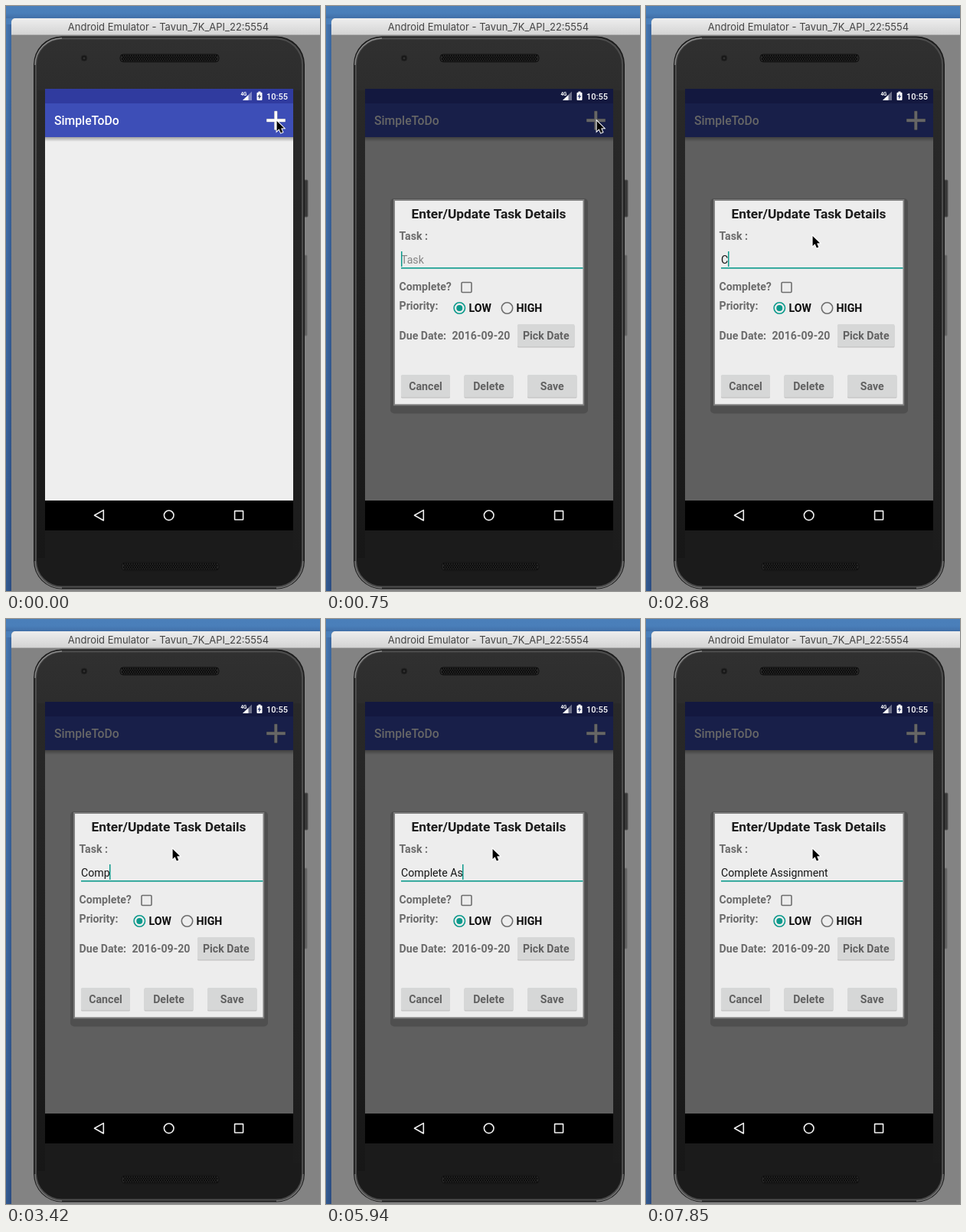
An HTML page with a canvas that plays this animation: 410 px wide and 763 px high, repeating every 8 s.

```html
<!DOCTYPE html>
<html lang="en">
<head>
<meta charset="utf-8">
<title>Task entry</title>
<style>
  html, body { margin: 0; width: 100%; height: 100%; overflow: hidden; background: #838383; }
  canvas { display: block; width: 410px; height: 763px; }
</style>
</head>
<body>
<canvas id="stage" width="410" height="763"></canvas>
<script>
const ctx = document.getElementById('stage').getContext('2d');
const LOOP = 8000, OPEN = 600, DIMMED = 750, BLINK = 443;
const DP = 324 / 411.4;
const TEAL = '#0d9a8c', LABEL = '#6b6b6b';
const TASK = 'Complete Assignment';
const KEY_TIMES = [2680, 2970, 3120, 3420, 3570, 3710, 4010, 4300, 4900, 5640,
  5940, 6080, 6230, 6520, 6670, 6820, 6960, 7110, 7400];
const MOVE_TIMES = [750, 900, 1040, 1190, 1340, 1490];

function rect(x, y, w, h, fill) {
  ctx.fillStyle = fill;
  ctx.fillRect(x, y, w, h);
}

function round(x, y, w, h, r, fill, stroke, width = 1) {
  ctx.beginPath();
  ctx.roundRect(x, y, w, h, r);
  paint(fill, stroke, width);
}

function circle(x, y, r, fill, stroke, width = 1) {
  ctx.beginPath();
  ctx.arc(x, y, r, 0, Math.PI * 2);
  paint(fill, stroke, width);
}

function poly(points, fill, stroke, width = 1) {
  ctx.beginPath();
  points.forEach(([x, y]) => ctx.lineTo(x, y));
  ctx.closePath();
  paint(fill, stroke, width);
}

function paint(fill, stroke, width) {
  if (fill) { ctx.fillStyle = fill; ctx.fill(); }
  if (stroke) { ctx.strokeStyle = stroke; ctx.lineWidth = width; ctx.stroke(); }
}

function gradient(x0, y0, x1, y1, ...colors) {
  const g = ctx.createLinearGradient(x0, y0, x1, y1);
  colors.forEach((c, i) => g.addColorStop(i / (colors.length - 1), c));
  return g;
}

function text(str, x, y, sp, weight, fill, align = 'left') {
  ctx.font = `${weight} ${sp * DP}px Roboto, sans-serif`;
  ctx.textAlign = align;
  ctx.fillStyle = fill;
  ctx.fillText(str, x, y);
}

function drawWindow() {
  rect(0, 0, 410, 763, gradient(0, 0, 0, 763, '#4a7fba', '#416fa8', '#365f96'));
  rect(0, 9, 410, 7, gradient(0, 9, 0, 16, 'rgba(0,0,40,0)', 'rgba(0,0,40,.12)'));
  rect(0, 24, 7, 739, gradient(0, 0, 7, 0, 'rgba(0,0,40,.03)', 'rgba(0,0,40,.2)'));
  round(7, 16, 420, 760, [5, 0, 0, 0], '#838383');
  round(7, 16, 420, 22, [5, 0, 0, 0], gradient(0, 16, 0, 38, '#eeeeee', '#d3d3d3'));
  rect(7, 37, 403, 1, '#b4b4b4');
  ctx.font = '13px Inter, sans-serif';
  ctx.textAlign = 'center';
  ctx.fillStyle = '#444';
  ctx.fillText('Android Emulator - Tavun_7K_API_22:5554', 212, 32);
}

function drawGrille(x, y, w) {
  round(x, y, w, 10, 4, '#262626', '#111');
  for (let row = 0; row < 4; row++)
    for (let dx = 2 + row % 2 * 1.5; dx < w - 3; dx += 3)
      rect(x + dx, y + 0.8 + row * 2.2, 1.8, 1.8, '#080808');
}

function drawPhone() {
  round(389, 227, 5, 48, 1, '#383838', '#555');
  round(389, 325, 4, 105, 1, '#5e5e5e', '#707070');
  round(36, 39.5, 354, 721, 37, '#1c1c1c');
  round(37.7, 41.2, 350.6, 717.6, 35.5, '#4c4c4c');
  round(40, 43.5, 346, 713, 33, gradient(0, 44, 0, 756, '#303030', '#242424', '#1b1b1b', '#1b1b1b'));
  rect(41, 110, 10, 610, gradient(0, 110, 0, 720, '#292929', '#171717'));
  rect(375, 110, 10, 600, gradient(0, 110, 0, 710, '#292929', '#1c1c1c'));
  ctx.beginPath();
  ctx.arc(73, 77, 35, Math.PI, Math.PI * 1.5);
  paint(null, '#8a8a8a', 1.4);
  ctx.beginPath();
  ctx.arc(353, 724, 35, 0, Math.PI / 2);
  ctx.moveTo(73, 759);
  ctx.arc(73, 724, 35, Math.PI / 2, Math.PI);
  paint(null, '#757575', 1.4);
  circle(102, 68, 4, '#171717', '#262626');
  circle(102, 68, 1.5, '#303030');
  drawGrille(149, 63, 129);
  drawGrille(151, 726, 127);
}

function drawPlus() {
  const arms = [[350.7, 137.3], [354, 137.3], [354, 147.5], [364.5, 147.5], [364.5, 150.9],
    [354, 150.9], [354, 161.3], [350.7, 161.3], [350.7, 150.9], [340.5, 150.9],
    [340.5, 147.5], [350.7, 147.5]];
  ctx.lineJoin = 'round';
  poly(arms, '#fff', '#a8a8a8', 1);
  poly(arms, '#fff');
}

function drawApp(dim) {
  rect(51, 171, 324, 475, '#eeeeee');
  rect(51, 171, 324, 6, gradient(0, 171, 0, 177, 'rgba(0,0,0,.32)', 'rgba(0,0,0,0)'));
  rect(51, 108, 324, 19, '#303b9f');
  rect(51, 127, 324, 44, '#3d4eb7');
  text('SimpleToDo', 63, 155, 20, 500, '#fff');
  drawPlus();
  if (dim) rect(51, 108, 324, 538, `rgba(0,0,0,${dim})`);
}

function drawSystemBars() {
  poly([[309, 123], [321, 123], [321, 111.5]], 'rgba(255,255,255,.38)');
  poly([[309, 123], [316.5, 123], [316.5, 116]], '#fff');
  text('4G', 306.5, 117, 8, 700, '#fff');
  rect(329.5, 111.5, 3, 2, '#fff');
  round(327.5, 112.7, 7, 10.3, 1, '#fff');
  poly([[331.6, 114], [328.6, 118.6], [330.5, 118.6], [330, 122], [333.2, 117.3], [331.3, 117.3]], '#303b70');
  text('10:55', 340, 122, 14, 500, '#fff');

  rect(51, 645, 324, 39, '#000');
  ctx.lineJoin = 'round';
  poly([[115.5, 664.3], [127.3, 657.6], [127.3, 671]], null, '#f0f0f0', 1.6);
  circle(212.7, 664.3, 6.3, null, '#f0f0f0', 1.6);
  round(298.6, 658.6, 11, 11.4, 0.6, null, '#f0f0f0', 1.6);
}

function drawButton(label, x, y, w) {
  round(x, y + 1, w, 29.5, 1.5, '#c2c2c2');
  round(x, y, w, 29.3, 1.5, '#d6d7d7');
  text(label, x + w / 2, y + 20, 18, 700, '#616161', 'center');
}

function drawDialog(t, opening) {
  if (opening) {
    round(79, 247, 267, 290, 8, '#6b6b6b');
    round(83, 250, 259, 282, 6, '#616161');
  } else {
    round(84, 251, 258, 280.5, 5, '#4f4f4f');
  }
  rect(88, 252, 249.3, 269.3, '#7e7e7e');
  rect(90, 254, 245.5, 265.3, '#ededed');
  text('Enter/Update Task Details', 212.5, 277, 22, 700, '#1c1c1c', 'center');

  text('Task :', 95.5, 305, 18, 700, LABEL);
  drawInput(t);
  text('Complete?', 95.5, 371, 18, 700, LABEL);
  round(177, 360.5, 13, 13, 1.2, null, '#6e6e6e', 1.6);

  text('Priority:', 95.5, 396, 18, 700, LABEL);
  circle(174.3, 394, 7.2, null, TEAL, 1.6);
  circle(174.3, 394, 4, TEAL);
  text('LOW', 186.5, 399, 18, 700, '#0c0c0c');
  circle(236.5, 394, 7.2, null, '#6e6e6e', 1.6);
  text('HIGH', 248.5, 399, 18, 700, '#0c0c0c');

  text('Due Date:', 95.5, 435, 18, 700, LABEL);
  text('2016-09-20', 164.5, 435, 18, 700, LABEL);
  drawButton('Pick Date', 250, 415, 74.5);
  drawButton('Cancel', 98, 481, 64);
  drawButton('Delete', 180.5, 481, 64);
  drawButton('Save', 263, 481, 64.5);
}

function drawInput(t) {
  const count = KEY_TIMES.filter(key => key <= t).length;
  const typed = TASK.slice(0, count);
  const lastKey = count ? KEY_TIMES[count - 1] : OPEN;
  text(typed || 'Task', 98, 336, 18, 400, typed ? '#161616' : '#858585');
  rect(98, 341, 237.5, 1.6, TEAL);
  // The caret restarts its blink at each key press.
  if (Math.floor((t - lastKey) / BLINK) % 2 === 0)
    rect(Math.floor(98 + ctx.measureText(typed).width), 320, 1.5, 20, TEAL);
}

function drawPointer(t) {
  const step = MOVE_TIMES.filter(m => m <= t).pop() ?? DIMMED;
  const p = (step - DIMMED) / 740;
  const e = p * p * (3 - 2 * p);
  ctx.save();
  ctx.translate(353.3 - 136 * e, 149.5 + 150 * e);
  ctx.lineJoin = 'miter';
  const arrow = [[0.3, 0.5], [0.3, 13.6], [3.3, 10.8], [5.6, 16], [8, 15], [5.8, 10], [9.8, 9.8]];
  poly(arrow, '#000', '#fff', 2);
  poly(arrow, '#000');
  ctx.restore();
}

function draw(now) {
  const t = now % LOOP;
  const opening = t < DIMMED;
  drawWindow();
  drawPhone();
  drawApp(t < OPEN ? 0 : opening ? 0.52 : 0.6);
  drawSystemBars();
  if (t >= OPEN) drawDialog(t, opening);
  drawPointer(t);
  requestAnimationFrame(draw);
}
requestAnimationFrame(draw);
</script>
</body>
</html>
```
